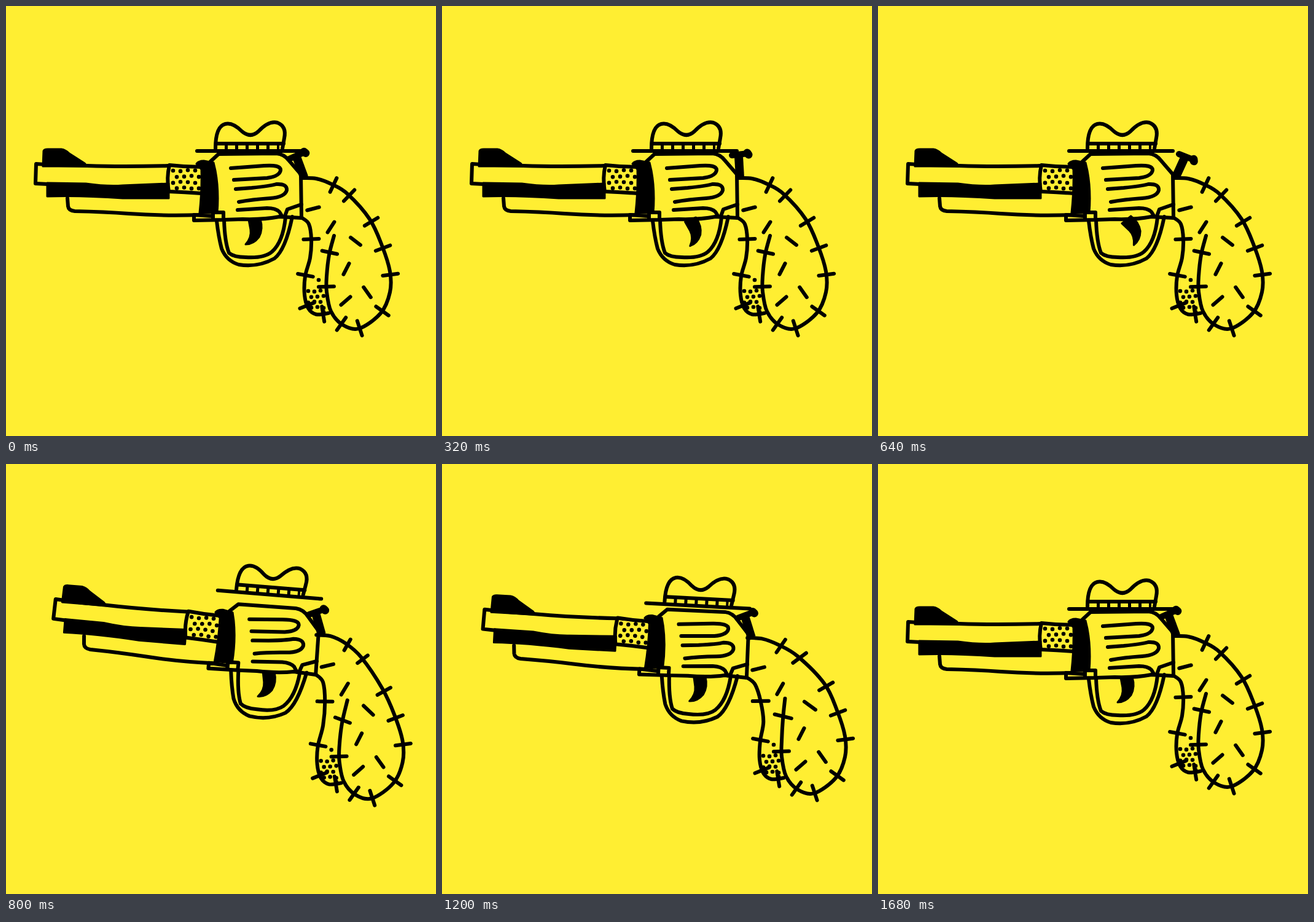
Write an HTML page that moves like this. It is 700x700 px and loops after 1.76 s.

```html
<!DOCTYPE html>
<html lang="en">
<head>
<meta charset="utf-8">
<title>Cactus revolver</title>
<style>
  html, body { margin: 0; width: 100%; height: 100%; overflow: hidden; background: #ffee32; }
  svg { display: block; width: 100%; height: 100%; }
  .line { fill: none; stroke: #000; stroke-width: 6; stroke-linecap: round; stroke-linejoin: round; }
  .solid { fill: #000; stroke: #000; stroke-width: 3; stroke-linejoin: round; }
  .dots { fill: none; stroke: #000; stroke-width: 6.6; stroke-linecap: round; }
  .band { stroke-width: 10; stroke-linecap: butt; stroke-dasharray: 5 12; }
  .stem { stroke-width: 14; stroke-linecap: butt; }
  .head { stroke-width: 10; }
  .knob { stroke-width: 13; }
</style>
</head>
<body>
<svg viewBox="0 0 700 700">
  <g class="line">
    <path id="back"/>
    <path id="belly"/>
    <path id="spines"/>
  </g>
  <path id="freckles" class="dots"/>

  <g id="gun">
    <!-- barrel -->
    <path class="solid" d="M61,236Q62,233 68,233L90,233Q97,234 103,240L128,256L132,261L60,261Z"/>
    <path class="line" d="M264,260Q190,262 132,260Q90,260 49,257L48,289L68,290"/>
    <path class="solid" d="M67,288L130,289Q165,294 190,292L265,289L265,313L190,313Q120,308 67,310Z"/>
    <path class="line" d="M100,313L101,326Q102,333 112,334Q160,335 200,338Q255,342 316,340"/>
    <path class="line" d="M318,262Q292,262 266,259Q261,280 265,302Q290,303 318,305"/>
    <path id="collar" class="dots"/>
    <path class="solid" d="M310,257Q313,252 322,252L338,255L341,268Q347,300 344,337L315,337Q319,300 318,266Z"/>

    <!-- frame and cylinder -->
    <path class="line" d="M333,253L346,241L440,240Q453,241 461,252L480,274L481,345"/>
    <path class="line" d="M306,340L335,342M306,340V349L355,348M336,336H354V348M337,336V348"/>
    <path class="line" d="M355,348L385,347Q420,348 445,343L481,345M481,323L458,331L454,342"/>
    <path class="line" d="M366,264L420,260Q447,258 447,267Q446,277 425,280L371,283M374,298L400,296Q430,293 440,290Q458,289 457,300Q454,311 430,313Q400,315 379,319M377,332L425,329Q439,329 445,335L450,343"/>

    <!-- guard -->
    <path class="line" d="M343,350Q346,376 351,395Q359,415 379,421Q410,426 437,411Q455,397 466,343M355,348Q356,384 363,402Q371,409 390,409Q420,411 433,400Q451,384 455,344"/>
    <path id="trigger" class="solid" d="M395,348L414,347Q419,363 412,376Q403,388 390,388Q400,377 398,364Z"/>

    <g id="hammer" class="line">
      <path class="stem" d="M485,279L483,245"/>
      <path class="head" d="M472,243L498,240"/>
      <path class="knob" d="M497,239L499,242"/>
    </g>

    <g id="hat" class="line">
      <path d="M341,232Q341,196 357,192Q369,189 384,204Q398,216 411,204Q428,186 442,190Q457,196 453,215L450,232"/>
      <path d="M344,224H452M311,236H480"/>
      <path class="band" d="M356,230H445"/>
    </g>
  </g>
</svg>
<script>
const STEP = 80, LOOP = 1760;
const $ = id => document.getElementById(id);
const set = (id, name, value) => $(id).setAttribute(name, value);
const clamp = v => Math.max(0, Math.min(1, v));
const smooth = t => t * t * (3 - 2 * t);
const mix = (a, b, k) => a + (b - a) * k;

// Cactus grip at rest: its two edges, as key points of smooth curves.
const back = [[482, 280], [505, 281], [530, 290], [556, 306], [592, 347], [612, 390], [625, 432], [625, 466],
  [610, 500], [575, 525], [548, 519], [529, 497], [522, 465], [522, 440], [526, 405], [534, 374]];
const belly = [[482, 345], [493, 355], [497, 380], [495, 410], [487, 440], [486, 470], [492, 492], [505, 502], [525, 500]];

// Smooth curve through points.
function curve(p) {
  const at = i => p[Math.max(0, Math.min(p.length - 1, i))];
  const handle = (i, side) => [0, 1].map(c => at(i)[c] + side * (at(i + 1)[c] - at(i - 1)[c]) / 6);
  let d = `M${p[0]}`;
  for (let i = 1; i < p.length; i++) d += `C${handle(i - 1, 1)} ${handle(i, -1)} ${p[i]}`;
  return d;
}

// Stroke of a given length centred on x, y.
function stroke(x, y, angle, length) {
  const dx = Math.cos(angle) * length / 2, dy = Math.sin(angle) * length / 2;
  return [[x - dx, y - dy], [x + dx, y + dy]];
}

// Spines stand across an edge at these distances along it.
function spinesOn(id, points, distances) {
  set(id, "d", curve(points));
  return distances.map(s => {
    const a = $(id).getPointAtLength(s - 4), b = $(id).getPointAtLength(s + 4);
    return stroke((a.x + b.x) / 2, (a.y + b.y) / 2, Math.atan2(b.y - a.y, b.x - a.x) + Math.PI / 2, 25);
  });
}

// Staggered rows of dots.
function dotGrid(x0, y0, cols, rows, dx, dy) {
  const dots = [];
  for (let r = 0; r < rows; r++)
    for (let c = 0; c < cols; c++)
      dots.push([x0 + (c + r % 2 / 2) * dx, y0 + r * dy + Math.sin(c * 2 + r)]);
  return dots;
}

const dotPath = dots => dots.map(p => `M${p}h0`).join("");

const spines = [
  ...spinesOn("back", back, [53, 84, 140, 187, 232, 294, 341, 373, 441, 497]),
  ...spinesOn("belly", belly, [40, 100, 150, 183]),
  ...[[500, 330, -.25], [529, 360, -1], [569, 383, .65], [554, 428, -1.1], [588, 466, .95], [553, 480, -.72]]
    .map(([x, y, angle]) => stroke(x, y, angle, 20))
];
const freckles = [[509, 446], ...dotGrid(492, 464, 3, 4, 10, 9), [517, 498]];
set("collar", "d", dotPath(dotGrid(272, 268, 4, 4, 12, 9.5)));

// [step, gun x, gun y, gun angle, hat lift, grip swing, grip drop]
const motion = [
  [0, 0, 0, 0, 0, 0, 0],
  [8, 0, 0, 0, 0, 0, 0],
  [11, 35, -3, 7, 22, -4, 32],
  [13, 31, -2, 5.3, 12, -9, 11],
  [15, 15, 3, 3.1, 3.5, 16, 8],
  [18, 0, 0, 0, 0, -11, 0],
  [21, 0, 0, 0, 0, 0, 0],
  [22, 0, 0, 0, 0, 0, 0]
];
const hammer = [[0, -17], [4, 0], [8, 28], [9, -17], [22, -17]];
const trigger = [[0, 0], [4, -19], [8, -36], [10, 0], [22, 0]];

function sample(track, f) {
  const i = track.findIndex(key => key[0] > f);
  const a = track[i - 1], b = track[i], k = (f - a[0]) / (b[0] - a[0]);
  return a.slice(1).map((v, j) => mix(v, b[j + 1], k));
}

function draw(f) {
  const [dx, dy, turn, lift, swing, drop] = sample(motion, f);
  // The grip follows the gun; its far end lags behind.
  const bend = ([x, y]) => {
    const k = smooth(clamp((Math.hypot(x - 482, y - 312) - 25) / 100));
    return [x + dx + swing * k, y + dy + drop * k];
  };
  set("back", "d", curve(back.map(bend)));
  set("belly", "d", curve(belly.map(bend)));
  set("spines", "d", spines.map(([a, b]) => `M${bend(a)}L${bend(b)}`).join(""));
  set("freckles", "d", dotPath(freckles.map(bend)));
  set("gun", "transform", `translate(${dx} ${dy}) rotate(${turn} 482 343)`);
  set("hat", "transform", `translate(0 ${-lift})`);
  set("hammer", "transform", `rotate(${sample(hammer, f)} 485 278)`);
  set("trigger", "transform", `rotate(${sample(trigger, f)} 405 348)`);
}

let start, last = 0;
function tick(now) {
  start ??= now;
  const f = Math.floor(((now - start) % LOOP) / STEP);
  if (f !== last) draw(last = f);
  requestAnimationFrame(tick);
}
draw(0);
requestAnimationFrame(tick);
</script>
</body>
</html>
```
